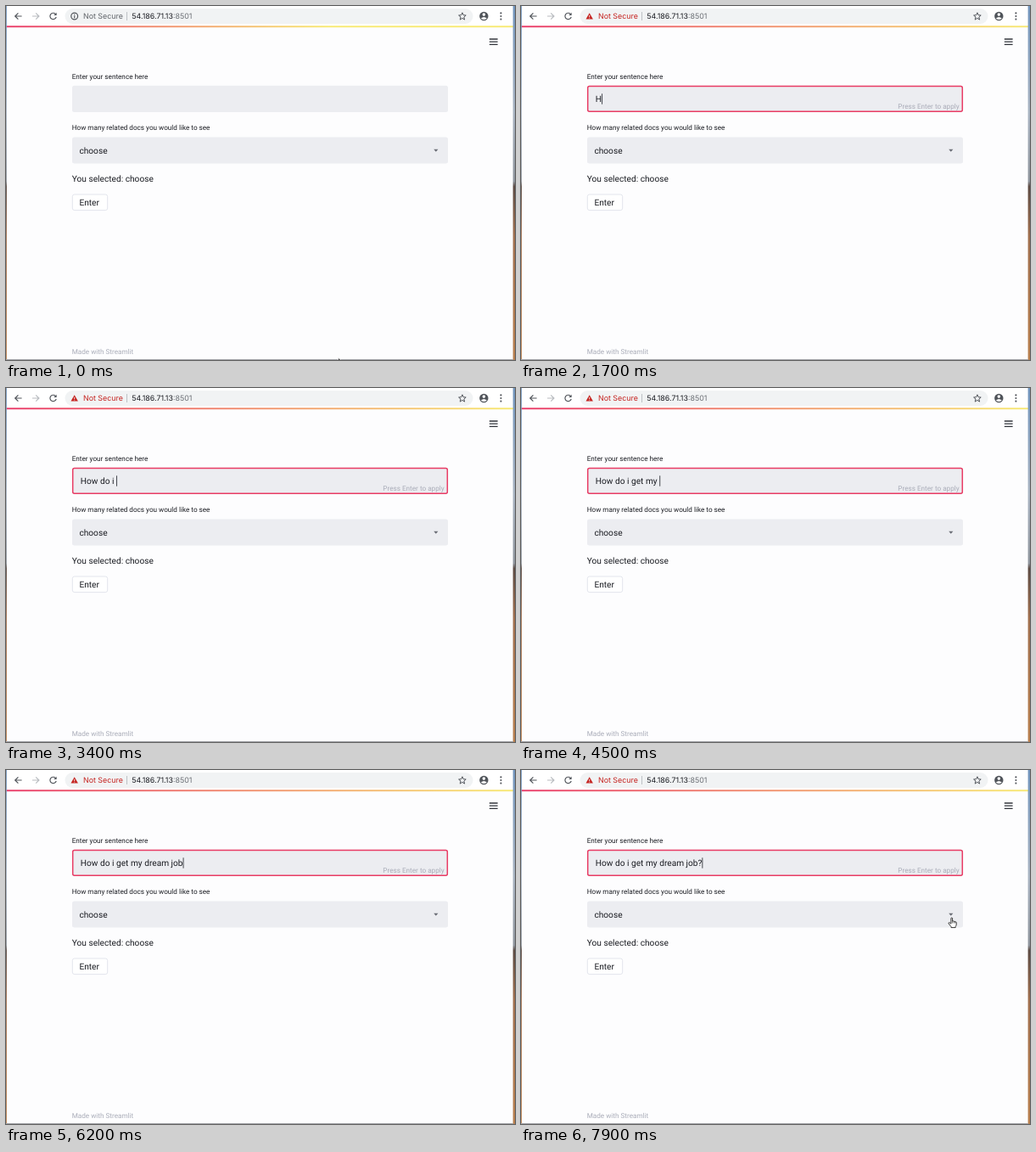
Recreate the animation shown at these times as an HTML page. Size 600x417 px, loop 8000 ms.

```html
<!DOCTYPE html>
<html lang="en">
<head>
<meta charset="utf-8">
<title>Sentence search</title>
<style>
  html, body { margin: 0; width: 100%; height: 100%; overflow: hidden; background: #fdfdfe; }
  svg { display: block; width: 600px; height: 417px; }
  text { font-family: Roboto, sans-serif; font-size: 10.16px; fill: #1a1c22; white-space: pre; text-rendering: geometricPrecision; }
  .small { font-size: 8.17px; }
  .faint { fill: #a9acb8; }
  .bar { font-family: Inter, sans-serif; font-size: 8.85px; }
  .line { fill: none; stroke: #50545a; stroke-width: 1.2; }
  .field { fill: #ecedf1; }
  .cursor path { stroke-linejoin: round; }
</style>
</head>
<body>
<svg viewBox="0 0 600 417" xmlns="http://www.w3.org/2000/svg">
  <defs>
    <linearGradient id="stripe" gradientUnits="userSpaceOnUse" x1="0" y1="0" x2="600" y2="0">
      <stop offset="0" stop-color="#ea3a68"/>
      <stop offset="1" stop-color="#f8ea72"/>
    </linearGradient>
    <linearGradient id="desk" x1="0" y1="0" x2="0" y2="1">
      <stop offset="0" stop-color="#7295bd"/>
      <stop offset=".3" stop-color="#a9b4c2"/>
      <stop offset=".495" stop-color="#8f959d"/>
      <stop offset=".51" stop-color="#5c4a42"/>
      <stop offset=".65" stop-color="#a1704f"/>
      <stop offset="1" stop-color="#b9804f"/>
    </linearGradient>
  </defs>

  <rect width="600" height="417" fill="#fdfdfe"/>
  <rect width="600" height="23" fill="#fff"/>
  <rect y="23.3" width="598" height="1.9" fill="url(#stripe)"/>

  <!-- browser toolbar -->
  <g class="line">
    <path d="M18.6 12H10.8M14.4 8.3L10.7 12L14.4 15.7"/>
    <path d="M31 12H38.8M35.2 8.3L38.9 12L35.2 15.7" stroke="#b9bcc0"/>
    <path d="M58.3 9.4A3.7 3.7 0 1 0 59.2 12.9"/>
    <path d="M59.6 7.7V11H56.3Z" fill="#50545a" stroke="none"/>
  </g>
  <rect x="69.5" y="3" width="481" height="18" rx="9" fill="#f1f3f4"/>
  <g id="info">
    <circle cx="80.7" cy="12" r="3.9" class="line" stroke-width="1"/>
    <path d="M80.7 11.4V14.2M80.7 9.7V10.7" class="line"/>
    <text x="91" y="15.3" class="bar" style="fill:#5f6368">Not Secure</text>
  </g>
  <g id="danger">
    <path d="M80.7 8.2L84.9 15.6H76.5Z" fill="#c5221f"/>
    <path d="M80.7 10.8V13.1M80.7 13.7V14.6" stroke="#f1f3f4" stroke-width=".9"/>
    <text x="91" y="15.3" class="bar" style="fill:#c5221f">Not Secure</text>
  </g>
  <path d="M142.5 7V17" stroke="#b8bbc0" stroke-width=".9"/>
  <text x="148.3" y="15.3" class="bar">54.186.71.13<tspan fill="#6a6e74">:8501</tspan></text>
  <path class="line" style="stroke-width:1" d="M537.9 7.8L539.1 10.7L542.2 11L539.8 13L540.6 16.1L537.9 14.4L535.2 16.1L536 13L533.6 11L536.7 10.7Z"/>
  <circle cx="563.3" cy="12" r="5.2" fill="#50545a"/>
  <circle cx="563.3" cy="10.1" r="1.8" fill="#fff"/>
  <path d="M559.8 14.6Q563.3 11.4 566.8 14.6Q563.3 17.6 559.8 14.6Z" fill="#fff"/>
  <g fill="#50545a">
    <circle cx="583.4" cy="8.4" r="1.05"/><circle cx="583.4" cy="12" r="1.05"/><circle cx="583.4" cy="15.6" r="1.05"/>
  </g>

  <!-- page -->
  <path d="M569.8 39H579.6M569.8 42.2H579.6M569.8 45.4H579.6" stroke="#33363d" stroke-width="1.3"/>
  <text x="77.7" y="86.4" class="small">Enter your sentence here</text>
  <rect x="78" y="93.7" width="443" height="31.2" rx="2.5" class="field"/>
  <rect id="focus" x="78.7" y="94.4" width="441.6" height="29.8" rx="2" fill="none" stroke="#e93b64" stroke-width="1.5"/>
  <text id="typed" x="87.8" y="113"></text>
  <rect id="caret" y="103.3" width=".9" height="12.4" fill="#33363d"/>
  <text id="hint" x="516.6" y="121.2" class="small faint" text-anchor="end">Press Enter to apply</text>

  <text x="77.7" y="146.3" class="small">How many related docs you would like to see</text>
  <rect x="78" y="154.4" width="443" height="31" rx="2.5" class="field"/>
  <text x="86.4" y="173.8">choose</text>
  <path d="M504.2 168.8H509.4L506.8 171.7Z" fill="#6a6d76"/>
  <text x="77.8" y="207.4">You selected: choose</text>
  <rect x="78.3" y="222" width="41.4" height="18.6" rx="2.5" fill="#fff" stroke="#e0e2ea" stroke-width=".9"/>
  <text x="86.4" y="234.7">Enter</text>
  <text x="77.7" y="410.2" class="small faint">Made with Streamlit</text>

  <!-- window edges -->
  <rect width=".9" height="417" fill="url(#desk)"/>
  <rect x="597.6" width="2.4" height="417" fill="url(#desk)"/>
  <rect y="416" width="598" height="1" fill="#a5a6aa"/>

  <!-- pointers, hot spot at 0,0 -->
  <g id="arrow" class="cursor">
    <path d="M0 0V10.2L2.4 8L4 11.7L5.7 11L4.1 7.4H7.4Z" fill="#111" stroke="#fff" stroke-width=".8"/>
  </g>
  <g id="beam" class="cursor" fill="none">
    <path d="M-2.2 -4.9Q0 -4.9 0 -3.4Q0 -4.9 2.2 -4.9M0 -3.6V3.6M-2.2 4.9Q0 4.9 0 3.4Q0 4.9 2.2 4.9M-1.3 1.6H1.3" stroke="#222" stroke-width="1"/>
  </g>
  <g id="hand" class="cursor">
    <path d="M-1.1 -5Q-.2 -6 .6 -5V-1.4Q1.5 -2.1 2.2 -1.1Q3.2 -1.7 3.8 -.7Q5.1 -1 5.2 .4V2.6Q5 4 4.2 5V6.1H-1V5Q-2.4 3.6 -4 1.1Q-4 -.2 -2.6 .4L-1.1 1.7Z" fill="#fff" stroke="#222" stroke-width=".9"/>
    <path d="M.6 -1.4V1M2.2 -1.1V1M3.8 -.7V1" stroke="#222" stroke-width=".6"/>
  </g>
</svg>
<script>
const LOOP = 8000, STEP = 100, BLINK = 500;
const FOCUS = 600, TYPING = 1400, MOVE = 6900;
const sentence = 'How do i get my dream job?';
// key presses in units of 100 ms, one per character
const keys = [14, 19, 21, 23, 24, 26, 28, 33, 34, 37, 38, 40, 41, 42, 44, 45,
  49, 52, 53, 54, 55, 57, 59, 60, 62, 66];

const $ = id => document.getElementById(id);
const typed = $('typed'), caret = $('caret'), stops = $('stripe');
const clamp = x => Math.max(0, Math.min(1, x));
const ramp = (t, a, b) => clamp((t - a) / (b - a));
const ease = x => x * x * (3 - 2 * x);
const lerp = (a, b, k) => a + (b - a) * k;
const fade = (id, k) => $(id).setAttribute('opacity', k);

function pointer(t) {
  if (t < 100) return ['arrow', 391.6, 414.2];
  if (t < TYPING) {
    const k = ease(ramp(t, 200, 700));
    return ['beam', lerp(118, 131, k), lerp(150, 118, k)];
  }
  if (t < MOVE) return [];
  const k = ease(ramp(t, MOVE - STEP, 7700));
  const x = lerp(131, 508, k), y = lerp(118, 179.5, k);
  return [y < 125 ? 'beam' : y < 154 ? 'arrow' : 'hand', x, y];
}

function draw(t) {
  const count = keys.filter(k => k * 100 <= t).length;
  const text = sentence.slice(0, count);
  if (typed.textContent !== text) typed.textContent = text;

  const since = t - (count ? keys[count - 1] * 100 : FOCUS);
  const width = count ? typed.getComputedTextLength() : 0;
  caret.setAttribute('x', 87.9 + width);
  fade('caret', since >= 0 && since % (2 * BLINK) < BLINK ? 1 : 0);

  fade('focus', ramp(t, FOCUS - 200, FOCUS));
  fade('hint', count ? 1 : 0);
  const alert = ramp(t, TYPING - STEP, TYPING + STEP);
  fade('danger', alert);
  fade('info', 1 - alert);
  stops.setAttribute('x2', lerp(380, 600, ramp(t, 200, 900)));

  const [shape, x, y] = pointer(t);
  for (const id of ['arrow', 'beam', 'hand']) {
    fade(id, id === shape ? 1 : 0);
    if (id === shape) $(id).setAttribute('transform', `translate(${x} ${y})`);
  }
}

const start = performance.now();
function tick() {
  const t = (performance.now() - start) % LOOP;
  draw(t - t % STEP);
  requestAnimationFrame(tick);
}
tick();
</script>
</body>
</html>
```
